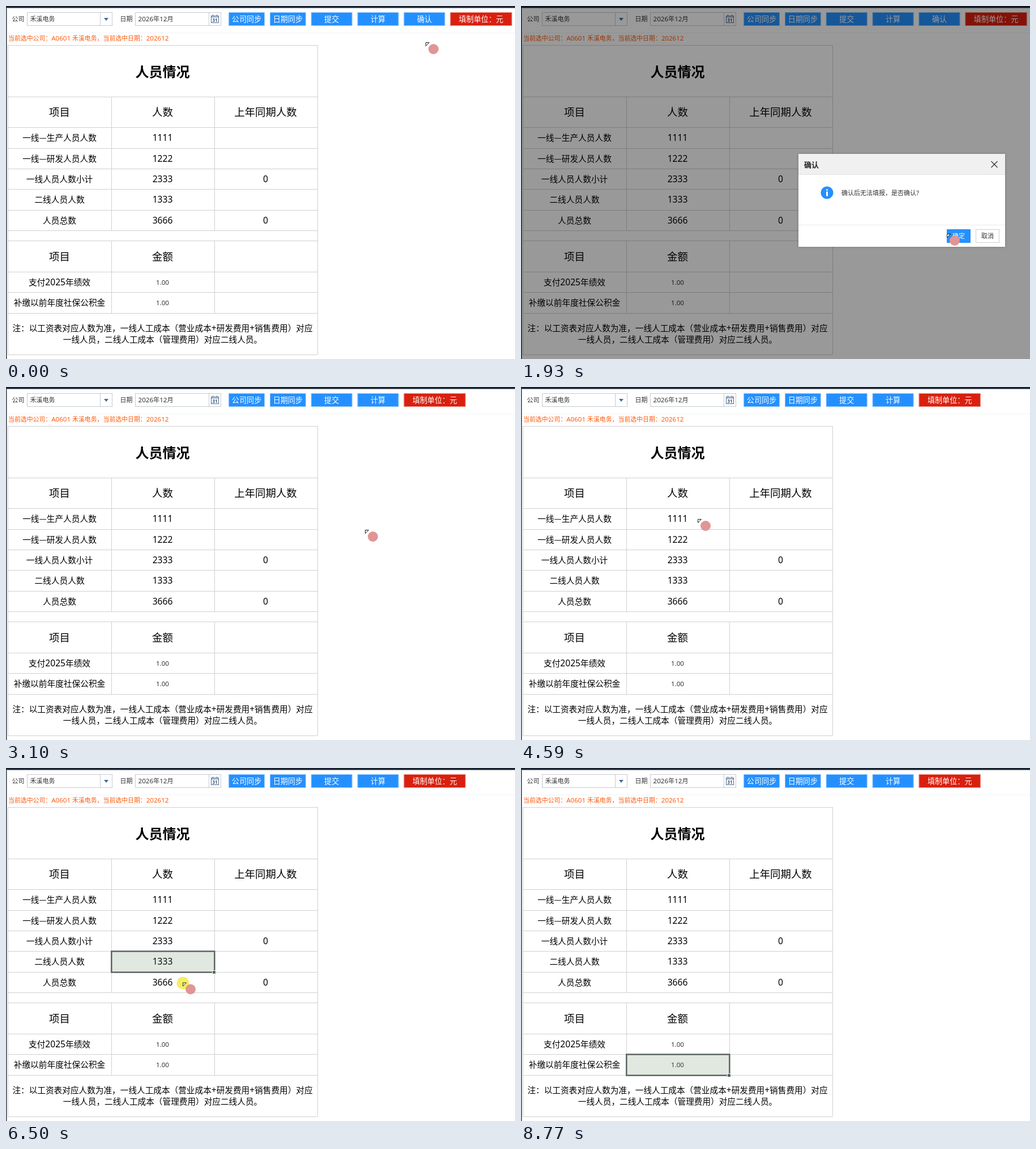
An HTML page with a canvas that plays this animation: 899 px wide and 623 px high, repeating every 8840 ms.

```html
<!DOCTYPE html>
<html lang="zh">
<head>
<meta charset="utf-8">
<title>人员情况</title>
<style>
html, body { margin: 0; width: 100%; height: 100%; overflow: hidden; background: #fff; }
canvas { display: block; }
</style>
</head>
<body>
<canvas id="stage" width="899" height="623"></canvas>
<script>
const W = 899, H = 623, LOOP = 8840;
const screen2d = document.getElementById('stage').getContext('2d');
let ctx = screen2d;

const BLUE = '#2490ff', RED = '#d9200f', GRID = '#d0d0d0', EDGE = '#c3cbd3', DARK = '#333';
const COMPANY = '禾溪电务';
const CJK = '"Noto Sans CJK SC", "Noto Sans CJK", sans-serif';
const LATIN = '"Noto Sans", sans-serif';

// The table stands on a square grid of 30 by 30 units
const UNIT = 18.2, LEFT = 3.5, TOP = 69;
const HEIGHTS = [5, 3, 2, 2, 2, 2, 2, 1, 3, 2, 2, 4];
const rowY = row => Math.floor(TOP + UNIT * HEIGHTS.slice(0, row).reduce((a, b) => a + b, 0));
const colX = col => Math.floor(LEFT + UNIT * 10 * col + 0.5);
const midX = col => LEFT + UNIT * 10 * (col + 0.5);
const midY = row => (rowY(row) + rowY(row + 1)) / 2 + 0.5;

// Clicked table rows, and every pointer move with its end time
const PICKS = [[4660, 2], [5360, 3], [5890, 4], [6230, 5], [6500, 6], [7310, 9], [7640, 10]]
  .map(([at, row]) => ({ at, row }));
const MOVES = [
  { end: 210, dur: 140, x: 739, y: 23 },
  { end: 620, dur: 200, x: 636, y: 151 },
  { end: 1790, dur: 1170, x: 752, y: 402 },
  { end: 2420, dur: 280, x: 634, y: 252 },
  { end: 4390, dur: 410, x: 312, y: 232 },
  ...PICKS.map(p => ({ end: p.at - 100, dur: 200, x: 312, y: midY(p.row) })),
  { end: 8050, dur: 270, x: 858, y: 433 }
];
const CLICKS = [350, 2000, ...PICKS.map(p => p.at)];

const clamp = v => Math.max(0, Math.min(1, v));
const easeOut = v => 1 - (1 - v) ** 3;

function rect(x, y, w, h, color) {
  ctx.fillStyle = color;
  ctx.fillRect(x, y, w, h);
}

function frame(x, y, w, h, color) {
  ctx.strokeStyle = color;
  ctx.lineWidth = 1;
  ctx.strokeRect(x + 0.5, y + 0.5, w - 1, h - 1);
}

function line(color, width, ...pts) {
  ctx.strokeStyle = color;
  ctx.lineWidth = width;
  ctx.beginPath();
  for (let i = 0; i < pts.length; i += 2) ctx.lineTo(pts[i], pts[i + 1]);
  ctx.stroke();
}

function disc(x, y, r, color) {
  ctx.fillStyle = color;
  ctx.beginPath();
  ctx.arc(x, y, r, 0, Math.PI * 2);
  ctx.fill();
}

// Chinese and Latin runs use separate fonts on one baseline
function text(str, x, y, size, { color = '#000', weight = 400, center = false } = {}) {
  const runs = str.match(/[\x20-\x7e]+|[^\x20-\x7e]+/g).map(s => {
    const latin = s.charCodeAt(0) < 127;
    const font = latin ? `${Math.max(weight, 400)} ${size * 1.06}px ${LATIN}` : `${weight} ${size}px ${CJK}`;
    ctx.font = font;
    return { s, font, w: ctx.measureText(s).width };
  });
  if (center) x -= runs.reduce((sum, r) => sum + r.w, 0) / 2;
  ctx.fillStyle = color;
  for (const r of runs) {
    ctx.font = r.font;
    ctx.fillText(r.s, x, y + size * 0.37);
    x += r.w;
  }
}

function button(label, x, w, color) {
  rect(x, 11, w, 24, color);
  frame(x, 11, w, 24, 'rgba(255,255,255,.45)');
  text(label, x + w / 2, 23, 13.1, { color: '#fff', weight: 300, center: true });
}

function ripple(t) {
  const p = (t - 350) / 420;
  if (p <= 0 || p >= 1) return;
  ctx.save();
  ctx.beginPath();
  ctx.rect(703, 11, 72, 24);
  ctx.clip();
  disc(739, 23, 34 * p, `rgba(0,0,0,${0.4 * (1 - p)})`);
  ctx.restore();
}

function field(label, x, w, value, split) {
  text(label, x - 26.5, 23, 11, { color: DARK });
  frame(x, 11, w, 24, EDGE);
  line(EDGE, 1, split + 0.5, 11, split + 0.5, 35);
  text(value, x + 5.5, 23, 11, { color: DARK });
}

function toolbar(t) {
  field('公司', 37, 151, COMPANY, 166);
  ctx.fillStyle = '#3d6c9e';
  ctx.beginPath();
  ctx.moveTo(173, 21);
  ctx.lineTo(181, 21);
  ctx.lineTo(177, 26);
  ctx.fill();

  field('日期', 228, 152, '2026年12月', 358);
  frame(362, 17, 14, 13, '#4d6c8f');
  line('#4d6c8f', 1, 362, 19.5, 376, 19.5);
  for (const x of [365.5, 372.5]) line('#4d6c8f', 1, x, 15, x, 18);
  text('31', 369, 25, 7.5, { color: '#35577d', weight: 700, center: true });

  const labels = ['公司同步', '日期同步', '提交', '计算'];
  if (t < 2900) labels.push('确认');
  let x = 393.2;
  for (const label of labels) {
    const w = UNIT * (label.length > 2 ? 3.5 : 4);
    button(label, x, w, BLUE);
    x += w + UNIT / 2;
  }
  button('填制单位：元', x, UNIT * 6, RED);
  ripple(t);

  rect(2, 47, W, 1, '#f1f3f5');
  text(`当前选中公司：A0601 ${COMPANY}，当前选中日期：202612`, 4, 57, 10.9, { color: '#ff5a0a' });
}

function row(index, size, cells, valueStyle) {
  cells.forEach((s, col) => {
    const style = col ? valueStyle : { weight: size > 16 ? 400 : 300 };
    if (s) text(s, midX(col), midY(index), col && valueStyle?.size || size, { ...style, center: true });
  });
}

function table() {
  for (let i = 0; i <= HEIGHTS.length; i++) rect(3, rowY(i), 547, 1, GRID);
  for (let col = 0; col <= 3; col++) {
    const spans = col % 3 ? [[1, 7], [8, 11]] : [[0, 12]];
    for (const [a, b] of spans) rect(col ? colX(col) : 3, rowY(a), 1, rowY(b) - rowY(a), GRID);
  }

  text('人员情况', midX(1), 116, 24, { weight: 700, center: true });
  row(1, 18.4, ['项目', '人数', '上年同期人数']);
  const counts = { weight: 500 };
  row(2, 14.7, ['一线—生产人员人数', '1111'], counts);
  row(3, 14.7, ['一线—研发人员人数', '1222'], counts);
  row(4, 14.7, ['一线人员人数小计', '2333', '0'], counts);
  row(5, 14.7, ['二线人员人数', '1333'], counts);
  row(6, 14.7, ['人员总数', '3666', '0'], counts);
  row(8, 18.4, ['项目', '金额']);
  const amounts = { size: 10.9, color: DARK };
  row(9, 14.7, ['支付2025年绩效', '1.00'], amounts);
  row(10, 14.7, ['补缴以前年度社保公积金', '1.00'], amounts);

  const note = { weight: 300, center: true };
  text('注：以工资表对应人数为准，一线人工成本（营业成本+研发费用+销售费用）对应', midX(1), 569, 14.65, note);
  text('一线人员，二线人工成本（管理费用）对应二线人员。', midX(1), 589, 14.65, note);
}

function selection(t) {
  const pick = PICKS.filter(p => t >= p.at + 30).pop();
  if (!pick) return;
  const x = colX(1), y = rowY(pick.row), w = UNIT * 10, h = rowY(pick.row + 1) - y;
  rect(x, y, w, h, 'rgba(70,120,70,.17)');
  ctx.strokeStyle = '#5d6464';
  ctx.lineWidth = 2.5;
  ctx.strokeRect(x + 0.3, y + 0.5, w, h);
  rect(x + w - 4, y + h - 3, 7, 7, '#fff');
  rect(x + w - 3, y + h - 2, 5, 5, '#5d6464');
}

// The dialog is painted once, so that it can fade as a whole
function paintDialog() {
  const layer = document.createElement('canvas');
  layer.width = W;
  layer.height = H;
  ctx = layer.getContext('2d');

  ctx.shadowColor = 'rgba(0,0,0,.25)';
  ctx.shadowBlur = 4;
  rect(490, 261, 365, 164, '#fff');
  ctx.shadowColor = 'transparent';
  rect(490, 261, 365, 37, '#f0f0f0');
  rect(490, 297, 365, 1, '#e2e2e2');
  rect(490, 386, 365, 1, '#ebebeb');
  text('确认', 500, 280, 13, { color: '#222', weight: 700 });
  line(DARK, 1.2, 830.5, 274, 841.5, 285);
  line(DARK, 1.2, 841.5, 274, 830.5, 285);

  disc(540.5, 329.5, 11, BLUE);
  disc(540.5, 324.5, 1.5, '#fff');
  rect(539, 327.5, 3, 8, '#fff');
  text('确认后无法填报，是否确认?', 566, 330, 11, { color: DARK });

  rect(752, 394, 42, 24, BLUE);
  text('确定', 773, 406, 11, { color: '#fff', center: true });
  frame(803, 394, 42, 24, '#d2cccc');
  text('取消', 824, 406, 11, { color: DARK, center: true });

  ctx = screen2d;
  return layer;
}
const dialogLayer = paintDialog();

function dialog(t) {
  const p = clamp((t - 550) / 160) - clamp((t - 2210) / 160);
  if (p <= 0) return;
  const k = 0.3 + 0.7 * p, cx = 672.5, cy = 343;
  ctx.globalAlpha = p;
  ctx.drawImage(dialogLayer, cx - cx * k, cy - cy * k, W * k, H * k);
  ctx.globalAlpha = 1;
}

function tipAt(t) {
  let x = 741, y = 64;
  for (const m of MOVES) {
    const k = easeOut(clamp((t - m.end + m.dur) / m.dur));
    x += (m.x - x) * k;
    y += (m.y - y) * k;
  }
  return [x, y];
}

function pointer(t) {
  if (t >= 8110) return;
  const [x, y] = tipAt(t);
  if (CLICKS.some(c => t >= c && t < c + 140)) disc(x + 0.5, y + 1, 11, 'rgba(243,234,70,.85)');
  ctx.beginPath();
  ctx.moveTo(x + 0.5, y + 0.5);
  ctx.lineTo(x + 6.5, y + 0.5);
  ctx.lineTo(x + 0.5, y + 6.5);
  ctx.closePath();
  ctx.fillStyle = '#fff';
  ctx.fill();
  ctx.strokeStyle = '#222';
  ctx.lineWidth = 1;
  ctx.stroke();
  disc(x + 14, y + 12, 9, '#df9694');
}

function draw(now) {
  const t = now % LOOP;
  rect(0, 0, W, H, '#fff');
  rect(0, 0, W, 3, '#182230');
  rect(0, 3, W, 1, '#8b9199');
  rect(0, 3, 1, H, '#30343a');
  rect(1, 3, 1, H, '#a5a8ac');
  toolbar(t);
  table();
  selection(t);
  if (t >= 550 && t < 2770) rect(0, 0, W, H, 'rgba(0,0,0,.4)');
  dialog(t);
  pointer(t);
  requestAnimationFrame(draw);
}
requestAnimationFrame(draw);
</script>
</body>
</html>
```
